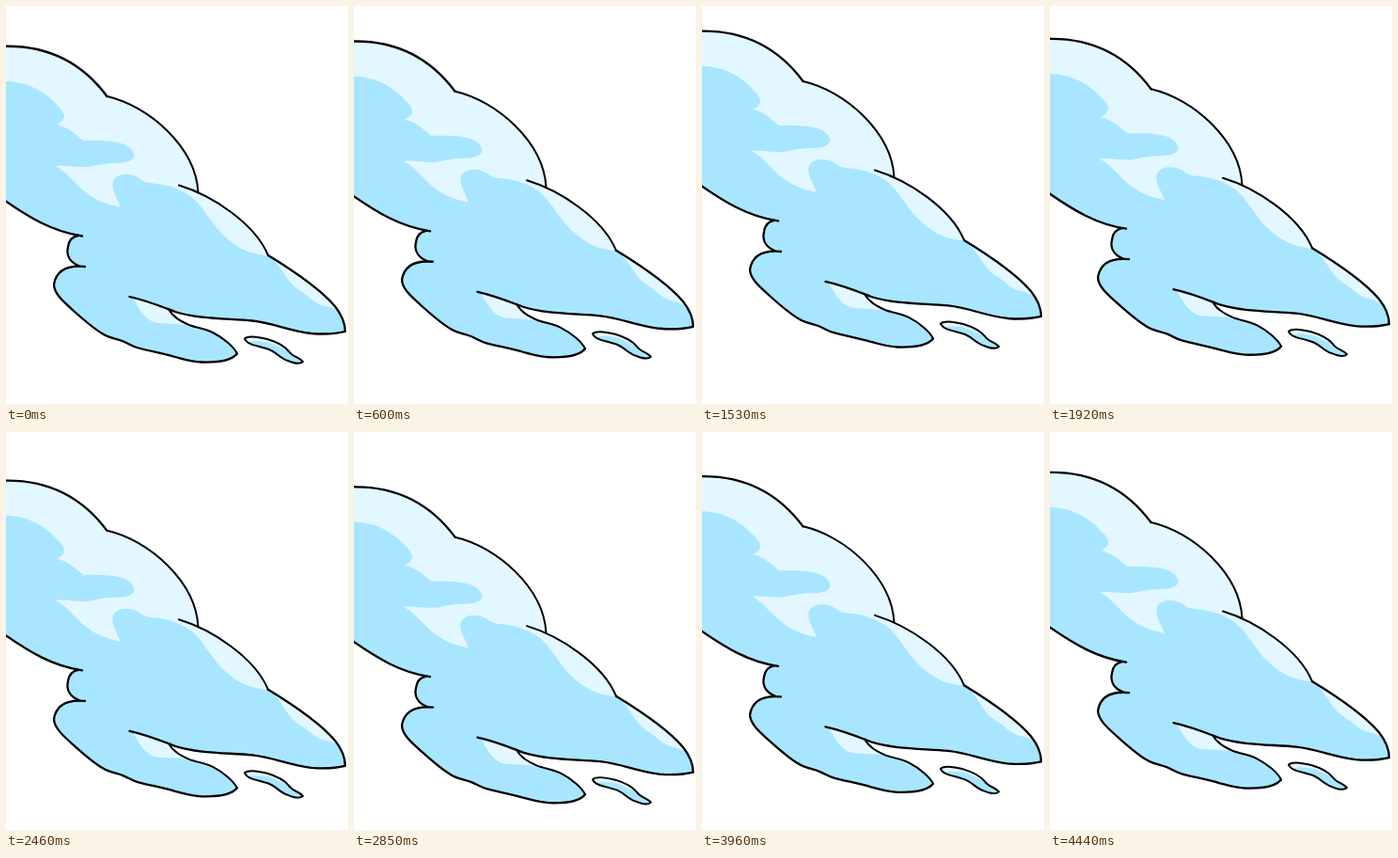
An HTML page that plays this animation: 364 by 423 pixels, repeating every 4470 ms.

```html
<!DOCTYPE html>
<html lang="en">
<head>
<meta charset="utf-8">
<title>Floating cloud</title>
<style>
  html, body { margin: 0; width: 100%; height: 100%; overflow: hidden; background: #fff; }
  svg { display: block; width: 364px; height: 423px; }
  .line { fill: none; stroke: #000; stroke-width: 2.3; stroke-linecap: round; stroke-linejoin: round; }
  .thin { stroke-width: 2; }
  .blue { fill: #a8e6ff; }
  .light { fill: #e2f7ff; }
</style>
</head>
<body>
<svg viewBox="0 0 364 423">
  <defs>
    <path id="body" d="M-8 43 C46 40 83 63 107.500 96 C152 106 202 150 204.500 198
      C232 209 267 236 279 265 C302 279 333 299 350 319 C358 329 361 337 361 346
      C349 349 338 349 325 348 C300 345 285 337 262 334.500 C235 332 205 333 173 322
      C178 331 186 335 195 339 C203 342 212 343 220 347 C232 353 243 363 246 369.500
      C240 377 225 379 208 378.500 C198 378 190 375.500 180 373 C170 370 155 367 141 363.500
      C135 362 131 359 125 356.500 C118 353.500 111 353.500 103 348.500
      C92 342 82 333 72 324 C62 315 51 306 51 296 C53 284 62 277 78 276.500
      C67 272 64 264 66 256 C67 248 71 245 77 244 C50 240 26 226 -8 202 Z"/>
    <path id="drop" d="M254 353.500 C258 350 270 352 278 354 C288 357 296 361 301 367
      C305 373 312 373 316 378 C313 381 306 379.500 300 377 C290 374 288 367 277 364
      C268 361 256 360 254 353.500 Z"/>
    <clipPath id="inside"><use href="#body"/></clipPath>
  </defs>
  <g id="cloud">
    <use href="#body" class="blue"/>
    <g class="light" clip-path="url(#inside)">
      <path d="M-8 80 C26 78 46 95 58 109 C65 117 62 122 54 126 C65 128 74 136 82 143
        C100 143 124 142 133 152 C140 160 136 166 120 167 C105 167 98 169 88 171
        C75 172 64 169 53 170 C74 182 80 206 122 214 C119 205 111 195 114 186
        C118 177 134 177 143 184 C149 189 155 188 162 189 C174 191 180 193 188 197
        C210 208 214 228 234 246 C248 259 262 264 282 266 L282 30 L-8 30 Z"/>
      <path d="M285 270 C297 282 299 294 312 302 C324 309 328 317 340 319 C346 320 350 322 354 326 L352 300 Z"/>
      <path d="M135 310 C141 321 148 335 162 337 C175 338 184 338 195 339 L173 322 Z"/>
    </g>
    <g class="line">
      <path d="M-8 43 C46 40 83 63 107.500 96"/>
      <path class="thin" d="M107.500 96 C152 106 202 150 204.500 198"/>
      <path class="thin" d="M184 190.500 C219 201 265 231 279 265"/>
      <path d="M279 265 C302 279 333 299 350 319 C358 329 361 337 361 346
        C349 349 338 349 325 348 C300 345 285 337 262 334.500 C235 332 205 333 180 325
        C162 318 150 313 131.500 309"/>
      <path class="thin" d="M173 322 C178 331 186 335 195 339 C203 342 212 343 220 347
        C232 353 243 363 246 369.500"/>
      <path d="M246 369.500 C240 377 225 379 208 378.500 C198 378 190 375.500 180 373
        C170 370 155 367 141 363.500 C135 362 131 359 125 356.500
        C118 353.500 111 353.500 103 348.500 C92 342 82 333 72 324
        C62 315 51 306 51 296 C53 284 62 275 84 277"/>
      <path d="M78 276.500 C67 272 64 264 66 256 C67 248 71 245 77 244"/>
      <path d="M81 244.500 C50 240 26 226 -8 202"/>
    </g>
    <use href="#drop" class="blue"/>
    <path class="light" d="M254 353.500 C258 350 270 352 278 354 C288 357 296 361 301 367
      C292 364 284 358 275 357 C268 356 261 356 257 358 Z"/>
    <use href="#drop" class="line thin"/>
  </g>
</svg>
<script>
  const LOOP = 4470;
  // [time in ms, vertical offset in px]
  const KEYS = [[0, 0], [150, 0], [1355, -17], [2955, 16], [4500, 0]];
  const cloud = document.getElementById('cloud');
  const ease = p => (1 - Math.cos(Math.PI * p)) / 2;

  function offsetAt(t) {
    const i = KEYS.findIndex(([end]) => t < end);
    const [t0, y0] = KEYS[i - 1], [t1, y1] = KEYS[i];
    return y0 + (y1 - y0) * ease((t - t0) / (t1 - t0));
  }

  const start = performance.now();
  function draw(now) {
    const y = offsetAt(Math.max(0, now - start) % LOOP);
    cloud.setAttribute('transform', `translate(0 ${y.toFixed(2)})`);
    requestAnimationFrame(draw);
  }
  draw(start);
</script>
</body>
</html>
```
